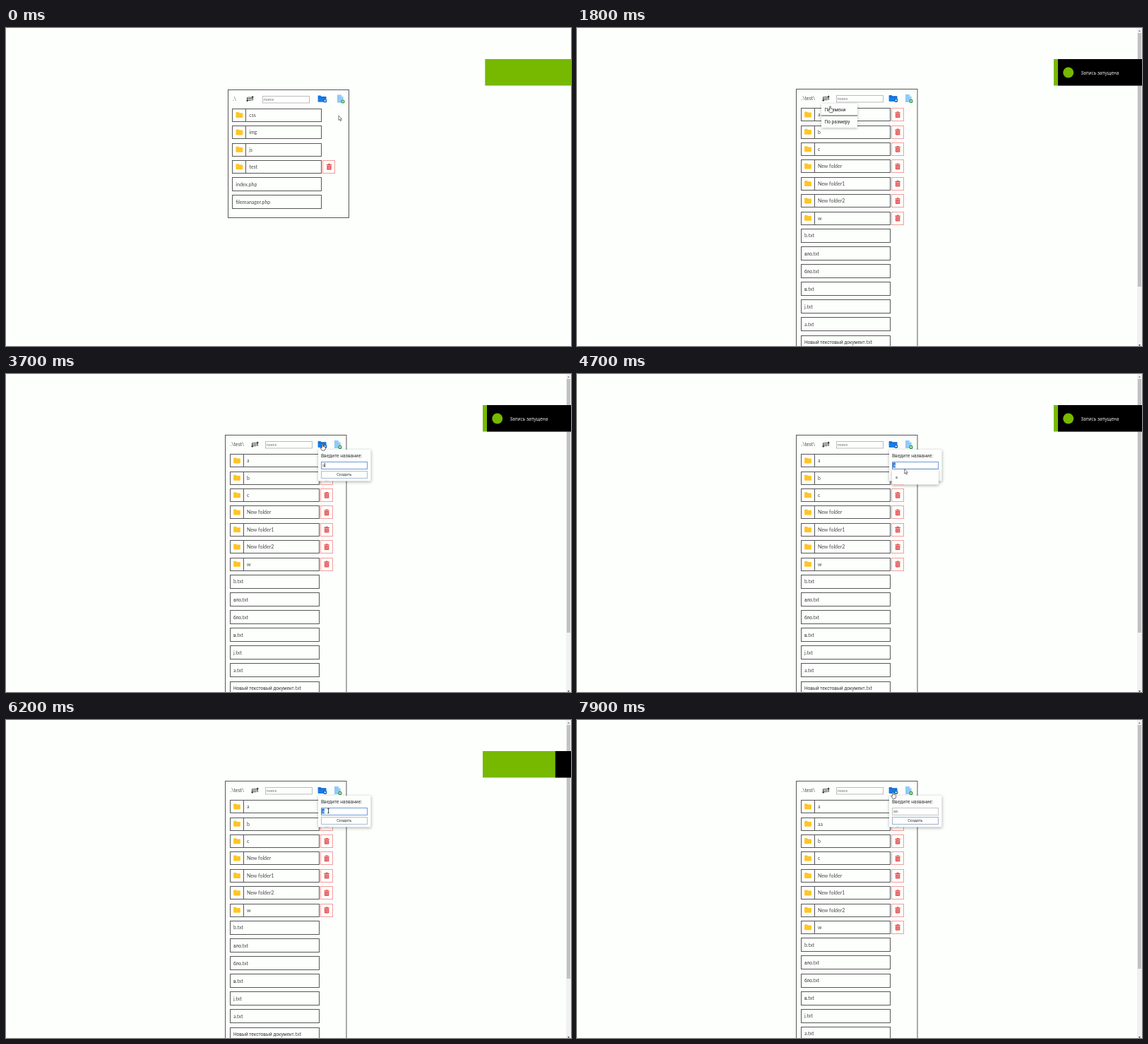
An HTML page with a canvas that plays this animation: 800 px wide and 450 px high, repeating every 8 s.

```html
<!DOCTYPE html>
<html lang="ru">
<head>
<meta charset="utf-8">
<title>File manager</title>
<style>
html, body { margin: 0; width: 100%; height: 100%; overflow: hidden; background: #fdfffd; }
canvas { display: block; }
</style>
</head>
<body>
<canvas id="stage" width="800" height="450"></canvas>
<script>
const ctx = document.getElementById('stage').getContext('2d');
const LOOP = 8000, STEP = 100;
const LATIN = 'Lato, sans-serif', CYRILLIC = 'Roboto, sans-serif';
const BORDER = '#565656', INK = '#484848';
const FILES = ['b', 'ало', 'бло', 'в', 'j', 'a', 'Новый текстовый документ'].map(n => n + '.txt');
const FOLDERS = ['a', 'b', 'c', 'New folder', 'New folder1', 'New folder2', 'w'];

// time, x, y of the hot spot, pointer shape from then on
const POINTER = [
  [0, 471, 124, 'arrow'], [500, 372, 197, 'hand'], [700, 372, 197, 'arrow'],
  [900, 372, 197, 'arrow'], [1200, 353, 102, 'hand'], [1600, 353, 102, 'hand'],
  [1800, 358.5, 110.5, 'hand'], [2200, 358.5, 110.5, 'hand'], [2800, 350.5, 98.5, 'hand'],
  [2900, 350.5, 98.5, 'arrow'], [3300, 466, 101, 'arrow'], [3500, 448, 99, 'hand'],
  [4100, 448, 99, 'arrow'], [4300, 456, 128, 'beam'], [4500, 403, 128, 'arrow'],
  [4700, 463.7, 134.5, 'arrow'], [5100, 463.7, 134.5, 'arrow'], [5300, 456, 128, 'beam'],
  [5500, 425, 128, 'beam'], [5800, 456.5, 128.5, 'beam'], [6500, 456.5, 128.5, 'beam'],
  [6900, 479, 134, 'beam'], [7100, 479, 141, 'arrow'], [7500, 479, 141, 'arrow'],
  [7800, 449, 111, 'arrow'], [7900, 447.5, 102, 'hand'], [8000, 447.5, 102, 'hand']
];

const clamp = v => Math.max(0, Math.min(1, v));
const progress = (t, from, to) => clamp((t - from) / (to - from));
const easeOut = p => 1 - (1 - p) ** 3;
const smooth = p => p * p * (3 - 2 * p);
const snap = v => Math.floor(v) + 0.5;

function fill(x, y, w, h, color) {
  ctx.fillStyle = color;
  ctx.fillRect(x, y, w, h);
}

function frame(x, y, w, h, color) {
  ctx.strokeStyle = color;
  ctx.lineWidth = 1;
  ctx.strokeRect(snap(x), snap(y), w, h);
}

function line(color, width, ...points) {
  ctx.strokeStyle = color;
  ctx.lineWidth = width;
  ctx.beginPath();
  for (let i = 0; i < points.length; i += 2) ctx.lineTo(points[i], points[i + 1]);
  ctx.stroke();
}

function shape(color, d, x = 0, y = 0, outline) {
  const path = new Path2D(d);
  ctx.save();
  ctx.translate(x, y);
  ctx.fillStyle = color;
  ctx.fill(path);
  if (outline) {
    ctx.strokeStyle = outline;
    ctx.lineWidth = 0.7;
    ctx.stroke(path);
  }
  ctx.restore();
}

function disc(x, y, r, color) {
  ctx.fillStyle = color;
  ctx.beginPath();
  ctx.arc(x, y, r, 0, 7);
  ctx.fill();
}

function text(str, x, y, size, color = INK, family = CYRILLIC) {
  ctx.font = `${size}px ${family}`;
  ctx.fillStyle = color;
  ctx.fillText(str, x, y);
  return ctx.measureText(str).width;
}

// Cyrillic and Latin parts of a name use different faces
function label(name, x, y) {
  for (const part of name.match(/[а-яё ]+|[^а-яё]+/gi)) {
    const cyrillic = /[а-яё]/i.test(part);
    x += cyrillic ? text(part, x, y, 6.5, '#333') : text(part, x, y, 7, INK, LATIN);
  }
}

function card(x, y, w, h) {
  ctx.save();
  ctx.shadowColor = 'rgba(0,0,0,.3)';
  ctx.shadowBlur = 4;
  ctx.shadowOffsetY = 1;
  fill(x, y, w, h, '#fdfffd');
  ctx.restore();
}

function trash(x, y) {
  frame(x, y, 17, 18, '#f49c9c');
  shape('#e05252', 'M5.2 5.6h2.3v-1h3v1h2.3v1.1H5.2zM5.8 7.2h6.4v5.4q0 .8-.8.8H6.6q-.8 0-.8-.8z', x, y);
  for (const dx of [7.5, 9, 10.5]) line('#f6b5b5', 0.6, x + dx, y + 8.2, x + dx, y + 12.4);
}

function folderRow(name, x, y, deletable) {
  frame(x, y, 126, 18, BORDER);
  line(BORDER, 1, snap(x + 19), snap(y), snap(x + 19), snap(y) + 18);
  shape('#ffc526', 'M5 5.6q0-.8.8-.8h2.9l1.2 1.2h4.1q.8 0 .8.8v5.2q0 .8-.8.8H5.8q-.8 0-.8-.8z', x, y);
  label(name, x + 23.8, y + 11.6);
  if (deletable) trash(x + 128, y);
}

function fileRow(name, x, y) {
  frame(x, y, 126, 19, BORDER);
  label(name, x + 4.8, y + 12);
}

function header(x, y, path, sortX, searchX, folderX, fileX) {
  text(path, x + 7, y + 16, 7, INK, LATIN);
  const s = sortX, top = y + 9;
  for (let i = 0; i < 4; i++) line('#555', 0.8, s + 2.5, top + 2 + i * 1.5, s + 9 - i * 0.5, top + 2 + i * 1.5);
  line('#222', 1, s + 1.7, top + 2, s + 1.7, top + 7);
  line('#222', 1, s + 9.2, top + 1, s + 9.2, top + 6.5);
  shape('#222', 'M0 6.3h3.4L1.7 8.6zM7.5 2.2h3.4L9.2 0z', s, top);

  frame(searchX, y + 9, 66, 9.5, '#bbb');
  text('поиск', searchX + 1.8, y + 16, 5.2, '#777');

  shape('#1a7be6', 'M0 .8q0-.8.8-.8h3l1.3 1.4h6q.8 0 .8.8v6.2q0 .8-.8.8H.8q-.8 0-.8-.8z', folderX - 0.4, y + 8.5);
  line('#0f5cb5', 0.7, folderX, y + 11, folderX + 11.3, y + 11);
  badge(folderX + 9.8, y + 16, '#1565c0');

  shape('#90caf9', 'M0 0h5.6l3 3v8.2H0z', fileX, y + 7.5);
  shape('#d6ecff', 'M5.6 0l3 3h-3z', fileX, y + 7.5);
  badge(fileX + 8, y + 17, '#36a045');
}

function badge(x, y, color) {
  disc(x, y, 2.6, color);
  line('#fff', 0.8, x - 1.5, y, x + 1.5, y);
  line('#fff', 0.8, x, y - 1.5, x, y + 1.5);
}

function list(x, y, folders, files, deletable) {
  const rowX = x + 6.5;
  folders.forEach((name, i) => folderRow(name, rowX, y + 27.2 + i * 24.4, deletable(name)));
  files.forEach((name, i) => fileRow(name, rowX, y + 27.2 + folders.length * 24.4 + i * 25.1));
}

function rootPage() {
  frame(314, 87, 171, 181, BORDER);
  header(314, 87, '.\\', 340, 363, 442, 469);
  list(314, 87, ['css', 'img', 'js', 'test'], ['index.php', 'filemanager.php'], n => n === 'test');
}

function testPage(created) {
  const folders = created ? ['a', 'aa', ...FOLDERS.slice(1)] : FOLDERS;
  frame(310.6, 86.4, 171.5, 500, BORDER);
  header(310.6, 86.4, '.\\test\\', 347, 367, 442, 465);
  list(310.6, 86.4, folders, FILES, () => true);
  fill(793, 0, 7, 450, '#f1f1f1');
  fill(794, 7, 5, (created ? 352 : 366) - 7, '#c1c1c1');
  shape('#777', 'M795 5h3l-1.5-2z');
  shape('#333', 'M795 448h3l-1.5 2z');
}

function sortMenu(t) {
  ctx.globalAlpha = t < 1500 ? 0.6 : 1;
  card(346, 107, 51, 34);
  text('По имени', 350.5, 118, 6.6, '#222');
  text('По размеру', 350.5, 135, 6.6, '#222');
  fill(346, 123.5, 51, 1, '#444');
  ctx.globalAlpha = 1;
}

function createForm(t) {
  const focused = t < 7400;
  const value = t >= 6500 ? 'aa' : 'a';
  const selected = t >= 4400 && t < 6300;
  card(442, 107, 74.5, 44.5);
  text('Введите название:', 446, 118, 6.6, '#333');
  fill(446, 124, 66, 10, '#fff');
  frame(446, 124, 65, 10, focused ? '#6c9ad4' : '#c4c4c4');
  if (selected) fill(447, 125.5, 4, 7, '#2f78d4');
  const width = text(value, 448, 131, 5.4, selected ? '#fff' : '#555');
  if (focused && !selected && t % 1000 >= 500) fill(448 + width, 126, 0.8, 6, '#222');
  frame(446, 137, 65, 10, focused ? '#a9bdd6' : '#9fb0cc');
  text('Создать', 468.2, 144, 5.5, '#333');
  if (t >= 4600 && t < 5200) {
    card(446, 135, 66, 21.5);
    text('a', 451, 148, 5.2, '#222');
  }
}

function notification(t) {
  const leave = easeOut(progress(t, 6400, 6800));
  const green = 678.3 - 3.3 * progress(t, 0, 100) + 125 * leave;
  const black = 681 + 119 * (1 - easeOut(progress(t, 100, 500))) + 119 * easeOut(progress(t, 6050, 6400));
  if (green < 800) fill(green, 44, 800 - green, 37.5, '#76b900');
  if (black < 800) fill(black, 44, 800 - black, 37.5, '#000');
  ctx.globalAlpha = progress(t, 500, 900) * (1 - progress(t, 5200, 5700));
  disc(695.7, 63, 7.5, '#76b900');
  text('Запись запущена', 713.5, 65.6, 6.3, '#fff', '"Open Sans", sans-serif');
  ctx.globalAlpha = 1;
}

function pointer(t) {
  const i = Math.max(0, POINTER.findIndex(k => k[0] > t) - 1);
  const [t0, x0, y0, kind] = POINTER[i], [t1, x1, y1] = POINTER[i + 1];
  const p = smooth(progress(t, t0, t1));
  const x = x0 + (x1 - x0) * p, y = y0 + (y1 - y0) * p;
  if (kind === 'arrow') {
    shape('#fff', 'M0 0v6.6l1.5-1.4 1.1 2.5 1.1-.5-1.1-2.4h2z', x, y, '#444');
  } else if (kind === 'hand') {
    shape('#fff', 'M-.8 .5q.8-1 1.6 0v3q2.8 0 3.4 1.2v2.1q-.3 1-1 2.4H-.6q-1-1.8-2.4-3.4 .5-1.2 2.2.1z', x, y, '#333');
  } else {
    line('#333', 0.9, x, y - 3, x, y + 3);
    line('#333', 0.8, x - 1.5, y - 3.2, x + 1.5, y - 3.2);
    line('#333', 0.8, x - 1.5, y + 3.2, x + 1.5, y + 3.2);
  }
}

function draw(now) {
  const t = Math.floor((now % LOOP) / STEP) * STEP;
  fill(0, 0, 800, 450, '#fdfffd');
  if (t < 700) rootPage();
  else testPage(t >= 7400);
  if (t >= 1400 && t < 3100) sortMenu(t);
  if (t >= 3700) createForm(t);
  notification(t);
  pointer(t);
  requestAnimationFrame(draw);
}
requestAnimationFrame(draw);
</script>
</body>
</html>
```
